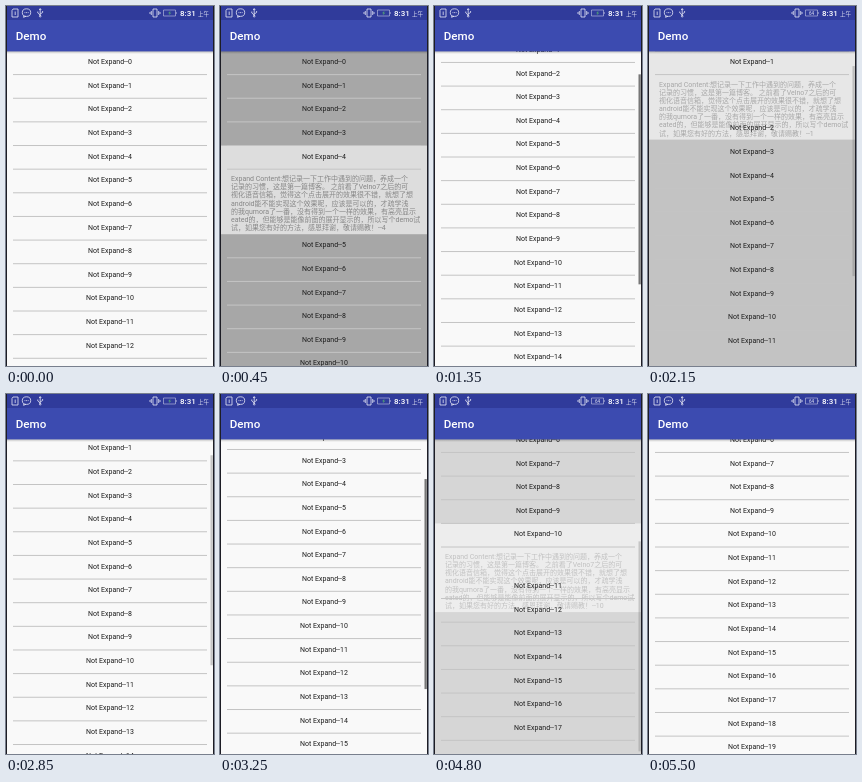
These frames come from a looping animation (208x360 px, 5.55 s). An HTML page:

```html
<!DOCTYPE html>
<html lang="zh">
<head>
<meta charset="utf-8">
<title>Demo</title>
<style>
  html, body { margin: 0; width: 100%; height: 100%; overflow: hidden; background: #f9f9f9; }
  svg { display: block; width: 208px; height: 360px; }
  text { font-family: Roboto, "Noto Sans CJK SC", "Noto Sans CJK", sans-serif; }
  .title { font-size: 7px; text-anchor: middle; fill: #1c1c1c; }
  .body { font-size: 7px; fill: #868686; }
</style>
</head>
<body>
<svg id="stage" viewBox="0 0 208 360">
  <rect id="back" y="45" width="208" height="315"/>
  <rect id="panel" width="208"/>
  <g id="content"></g>
  <g id="list"></g>
  <rect id="bar" x="204.5" width="2.3" height="210" fill="#777"/>
  <defs>
    <linearGradient id="shade" x2="0" y2="1">
      <stop stop-color="#000" stop-opacity=".25"/>
      <stop offset="1" stop-color="#000" stop-opacity="0"/>
    </linearGradient>
  </defs>
  <rect y="45" width="208" height="3" fill="url(#shade)"/>
  <rect width="208" height="45.4" fill="#3c4bb0"/>
  <rect width="208" height="14" fill="#303b9b"/>
  <path d="M.5 0V360M207.5 0V360" stroke="#1d1d25"/>
  <text x="9.8" y="33.7" font-size="11.6" font-weight="500" fill="#fff">Demo</text>
  <g fill="none" stroke="#e8e9f6" stroke-width=".8">
    <path d="M7 3H12V11H6V4.5ZM9.2 5.5V9"/>
    <ellipse cx="20.5" cy="6.6" rx="4.2" ry="3.8"/>
    <path d="M18 9.7L17.5 11.3L20 10.3M18.5 6.6h.9M20.1 6.6h.9M21.7 6.6h.9"/>
    <path d="M34.2 3V10M34.2 9L31.8 7V5.5M34.2 8L36.6 6.5V5M33.2 4L34.2 2.5L35.2 4"/>
    <circle cx="34.2" cy="10.2" r=".8"/>
    <path d="M147 3H151V11H147ZM145.3 5V9M152.7 5V9M144 6V8M154 6V8"/>
    <path d="M157.5 4H169.5V10H157.5ZM170.3 6V8" opacity=".6"/>
  </g>
  <path id="bolt" d="M164.5 4.8L162 7.2H163.4L162.7 9.2L165.4 6.7H163.9Z" fill="#4f9a78"/>
  <text id="level" x="163.5" y="8.7" font-size="4.6" fill="#e8e9f6" text-anchor="middle">64</text>
  <text x="174" y="10" font-size="8" font-weight="500" fill="#fff">8:31</text>
  <text x="192" y="9.8" font-size="5.5" fill="#e8e9f6">上午</text>
</svg>
<script>
const LOOP = 5550, STEP = 50, TOP = 45, BOTTOM = 360, ROW = 23.64, BODY = 65, COUNT = 20;
const BODY_LINES = [
  "Expand Content:想记录一下工作中遇到的问题，养成一个",
  "记录的习惯，这是第一篇博客。 之前看了Velno7之后的可",
  "视化语音信箱，觉得这个点击展开的效果很不错，就想了想",
  "android能不能实现这个效果呢，应该是可以的，才疏学浅",
  "的我qumora了一番，没有得到一个一样的效果，有高亮显示",
  "eated的，但能够是能像前面的展开显示的，所以写个demo试",
  "试，如果您有好的方法，感恩拜谢，敬请赐教！--"
];
// Each tap opens a row, holds it, then closes it again.
const TAPS = [
  { row: 4, open: [50, 450], close: [650, 1040] },
  { row: 1, open: [1910, 2310], close: [2450, 2800] },
  { row: 10, open: [4650, 4980], close: [5130, 5480] }
];
const SCROLL = [[1200, 0], [1350, 35.8], [1450, 38], [1650, 38], [1850, 23.64],
  [2830, 23.64], [3250, 60.4], [3950, 75.2], [4150, 75.2], [4600, 152]];
const BAR = [[1200, 0], [1250, 1], [1900, 1], [2300, 0], [2830, 0], [2880, 1],
  [3950, 1], [4150, .6], [4200, 1], [4600, 1], [4900, 0]];

const $ = id => document.getElementById(id);
const clamp = u => Math.min(1, Math.max(0, u));
const ease = u => .5 - .5 * Math.cos(Math.PI * clamp(u));
const ramp = (t, [a, b]) => ease((t - a) / (b - a));
const gray = v => `rgb(${v},${v},${v})`;

function track(keys, t) {
  const i = keys.findIndex(k => k[0] > t);
  if (i < 0) return keys[keys.length - 1][1];
  if (i === 0) return keys[0][1];
  const [t0, a] = keys[i - 1], [t1, b] = keys[i];
  return a + (b - a) * (t - t0) / (t1 - t0);
}

function add(parent, tag, attrs, text = "") {
  const el = document.createElementNS("http://www.w3.org/2000/svg", tag);
  for (const k in attrs) el.setAttribute(k, attrs[k]);
  el.textContent = text;
  return parent.appendChild(el);
}

function set(id, attrs) {
  for (const k in attrs) $(id).setAttribute(k, attrs[k]);
}

const rows = Array.from({ length: COUNT }, (_, i) => {
  const g = add($("list"), "g", {});
  add(g, "text", { class: "title", x: 104, y: 13.1 }, "Not Expand--" + i);
  add(g, "path", { d: "M7 23.6H201", stroke: "#c4c4c4", "stroke-width": 1 });
  return g;
});
const lines = BODY_LINES.map((s, i) =>
  add($("content"), "text", { class: "body", x: 11, y: 12 + i * 8.15 }, s));

function draw(t) {
  const tap = TAPS.find(p => t < p.close[1]) || TAPS[TAPS.length - 1];
  const open = ramp(t, tap.open) - ramp(t, tap.close);
  const opening = t > tap.open[0] && t < tap.close[0];
  const scroll = track(SCROLL, t);
  const rowY = i => TOP + i * ROW - scroll;

  rows.forEach((g, i) => {
    const below = i > tap.row;
    g.setAttribute("transform", `translate(0 ${rowY(i) + (below ? open * BODY : 0)})`);
    // Rows that the opened layout pushes off screen vanish at once.
    const pushedOut = opening && below && rowY(i) + BODY > BOTTOM;
    g.setAttribute("visibility", pushedOut ? "hidden" : "visible");
  });
  set("back", { fill: gray(Math.round(249 - 82 * open)) });
  set("panel", { y: rowY(tap.row), height: ROW + BODY, fill: gray(Math.round(249 - 28 * open)),
    opacity: open > 0 ? 1 : 0 });
  set("content", { transform: `translate(0 ${rowY(tap.row + 1)})`, opacity: open });
  lines[lines.length - 1].textContent = BODY_LINES[BODY_LINES.length - 1] + tap.row;
  set("bar", { y: 44 + .68 * scroll, opacity: track(BAR, t) });

  const showLevel = (t >= 1650 && t < 2700) || t >= 4000;
  set("level", { opacity: +showLevel });
  set("bolt", { opacity: +!showLevel });
}

const start = performance.now();
function tick() {
  const t = (performance.now() - start) % LOOP;
  draw(Math.floor(t / STEP) * STEP);
  requestAnimationFrame(tick);
}
tick();
</script>
</body>
</html>
```
